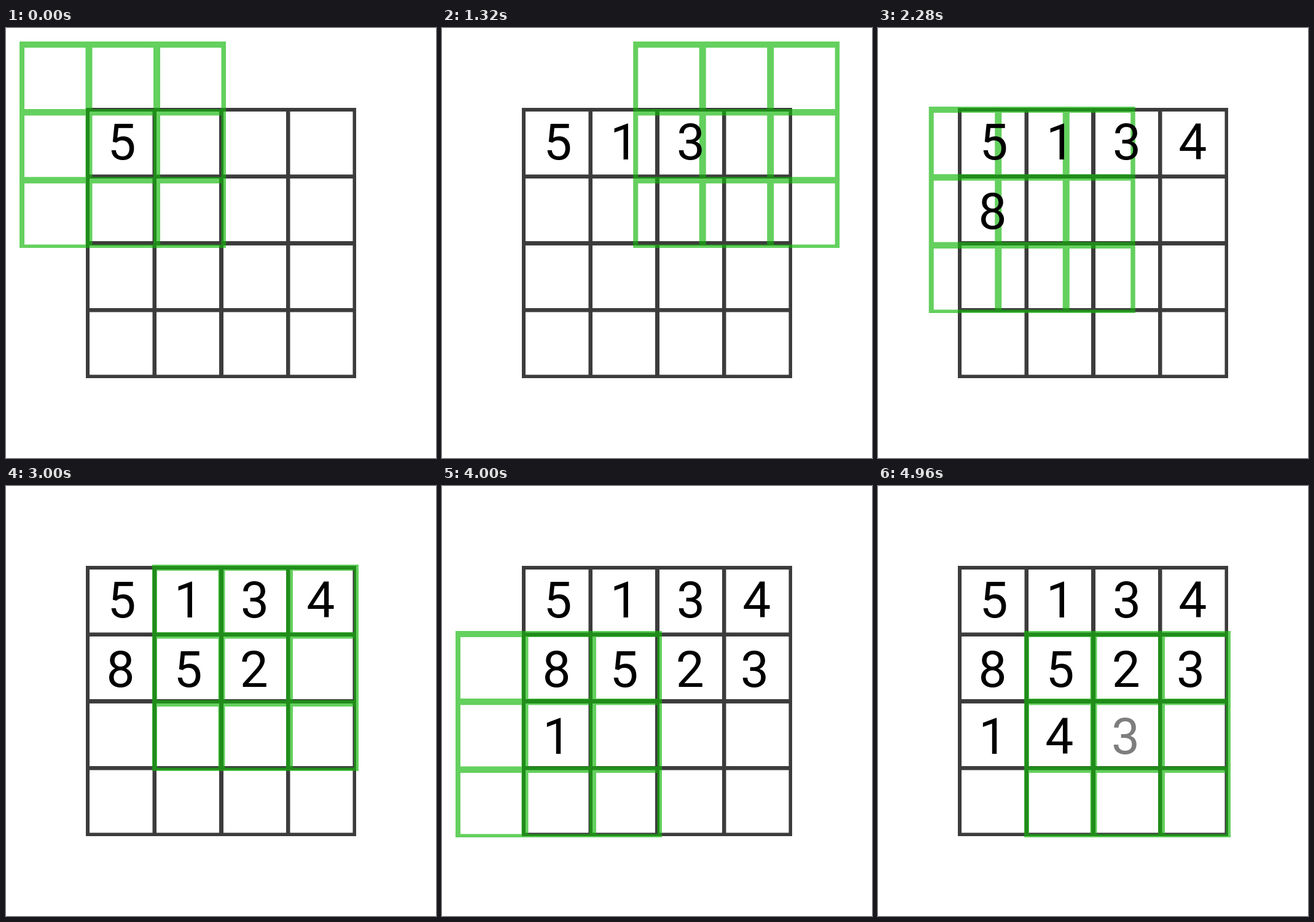
An HTML page for the animation above (5000 ms loop, 700 by 700 pixels).

```html
<!DOCTYPE html>
<html lang="en">
<head>
<meta charset="utf-8">
<title>Sliding window</title>
<style>
  html, body { margin: 0; width: 100%; height: 100%; overflow: hidden; background: #fff; }
  svg { display: block; width: 100%; height: 100%; }
  text { font: 400 82px Roboto, sans-serif; text-anchor: middle; fill: #000; }
</style>
</head>
<body>
<svg viewBox="0 0 700 700">
  <path id="grid" fill="#3c3c3c" fill-rule="evenodd"/>
  <path id="kernel" fill="rgb(18,183,8)" fill-opacity=".65" fill-rule="evenodd"/>
  <g id="digits"></g>
</svg>
<script>
const LOOP = 5000, STEP = 500, TICK = 40;
const REST = 100, MOVE = 320, FADE = 80;

const colX = [22, 130, 238, 344.5];
const rowY = [22, 128, 236];
const baseline = [214, 326.5, 436];

// [digit, centre x], in the order the window visits the cells
const cells = [
  [5, 188.5], [1, 296.8], [3, 405], [4, 512.2],
  [8, 186.6], [5, 296.5], [2, 403.8], [3, 509],
  [1, 187], [4, 295.3], [3, 403]
];

const clamp = v => Math.min(1, Math.max(0, v));
const lerp = (a, b, f) => a + (b - a) * f;
const rect = (x0, y0, x1, y1) => `M${x0} ${y0}H${x1}V${y1}H${x0}Z`;

// Outer box with one hole per [start, end] pair of columns and rows
function lattice(size, cols, rows) {
  let d = rect(0, 0, size, size);
  for (const [y0, y1] of rows)
    for (const [x0, x1] of cols) d += rect(x0, y0, x1, y1);
  return d;
}

const gridHoles = [[6, 108.5], [115, 217], [224, 326], [332.5, 434.5]];
const grid = document.getElementById('grid');
grid.setAttribute('d', lattice(440, gridHoles, gridHoles));
grid.setAttribute('transform', 'translate(130 130)');

const kernel = document.getElementById('kernel');
kernel.setAttribute('d', lattice(336,
  [[8, 107.5], [118.5, 218], [229, 328.5]],
  [[10, 110], [120.5, 220.5], [231, 330.5]]));

const place = i => [colX[i % 4], rowY[Math.floor(i / 4)]];

const digits = cells.map(([n, x], i) => {
  const el = document.createElementNS('http://www.w3.org/2000/svg', 'text');
  el.textContent = n;
  el.setAttribute('x', x);
  el.setAttribute('y', baseline[Math.floor(i / 4)]);
  document.getElementById('digits').append(el);
  return el;
});

function draw(time) {
  const t = Math.floor((time % LOOP) / TICK) * TICK;
  const k = Math.floor(t / STEP);
  const f = clamp((t - k * STEP - REST) / MOVE);
  const [x0, y0] = place(k), [x1, y1] = place(k + 1);
  kernel.setAttribute('transform', `translate(${lerp(x0, x1, f)} ${lerp(y0, y1, f)})`);
  digits.forEach((el, i) => {
    el.setAttribute('opacity', clamp((t - (i - 1) * STEP - REST - MOVE) / FADE));
  });
}

const start = performance.now();
function tick() {
  draw(performance.now() - start);
  requestAnimationFrame(tick);
}
draw(0);
requestAnimationFrame(tick);
</script>
</body>
</html>
```
